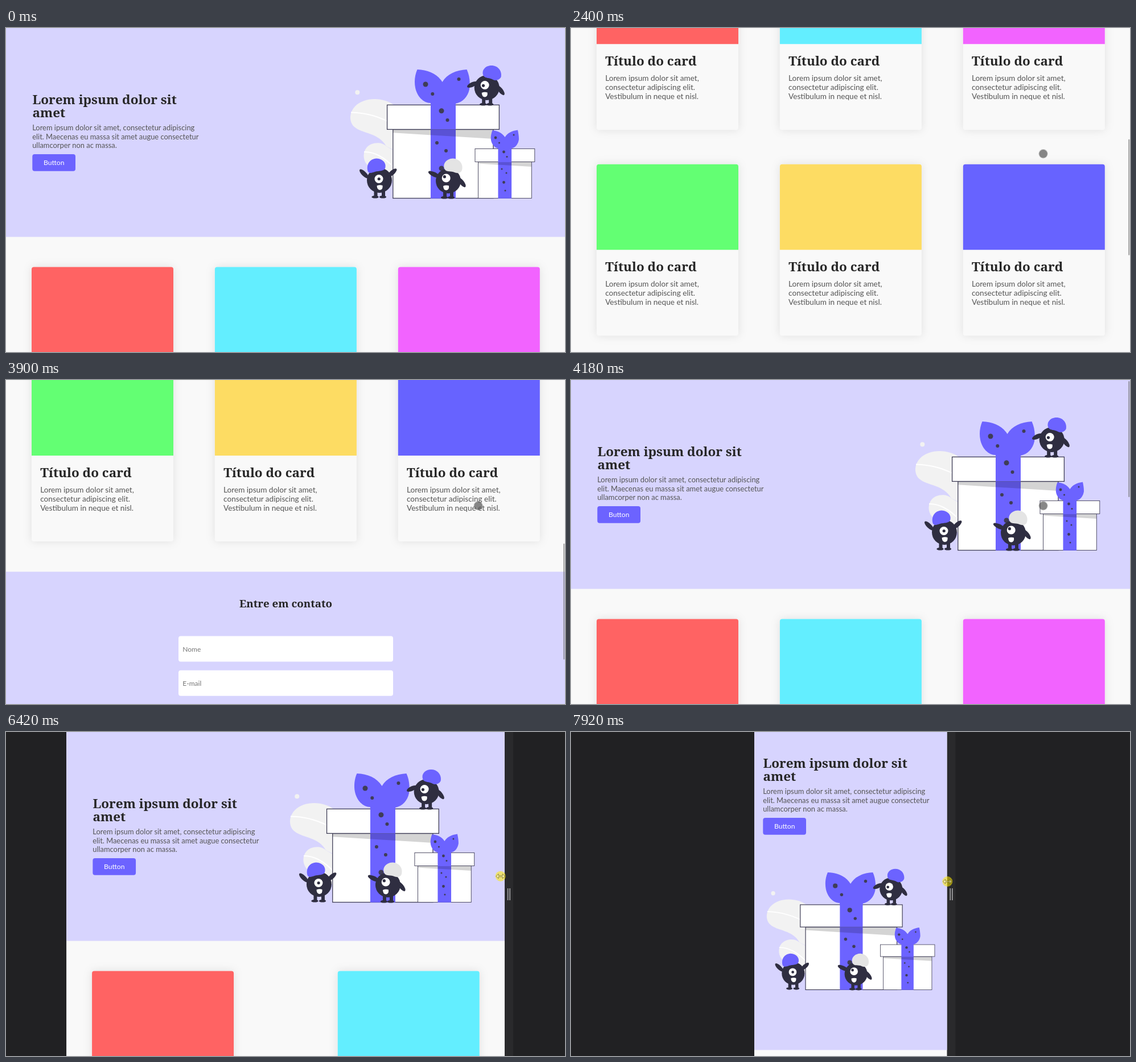
An HTML page for the animation above (7.99 s loop, 982 px wide and 570 px high).

```html
<!DOCTYPE html>
<html lang="pt">
<head>
<meta charset="utf-8">
<title>Landing page</title>
<style>
  html, body { margin: 0; width: 100%; height: 100%; overflow: hidden; background: #212123; }
  svg { display: block; }
  text { font-family: Lato, sans-serif; fill: #555; white-space: pre; }
  .h { font: 700 22.5px Merriweather, "Noto Serif", serif; fill: #262626; }
  .lead { font-size: 12.9px; }
  .body { font-size: 13.6px; }
  .field { font-size: 12px; fill: #757575; }
  .btn { font-size: 12.2px; fill: #fff; }
  .send { font: 13.3px Merriweather, "Noto Serif", serif; fill: #fff; }
  .card { filter: drop-shadow(0 0 8px rgba(0, 0, 0, .1)); }
  .line { fill: #fff; stroke: #3f3d56; }
</style>
</head>
<body>
<svg id="stage" width="982" height="570" viewBox="0 0 982 570">
  <rect width="982" height="570" fill="#212123"/>
  <g id="handle">
    <rect width="15" height="570" fill="#2a2a2c"/>
    <path d="M5.7 275v21M9.3 275v21" stroke="#a8a8aa" stroke-width="1.6"/>
  </g>
  <svg id="page" y="0" height="570" overflow="hidden">
    <rect width="982" height="570" fill="#f9f9f9"/>
    <g id="doc">
      <rect id="hero" width="982" fill="#d7d4fe"/>
      <g id="intro"></g>
      <g id="art"></g>
      <g id="cards"></g>
      <g id="contact"></g>
    </g>
    <rect id="bar" x="979" width="2.4" height="204" rx="1" fill="#777" fill-opacity=".6"/>
  </svg>
  <g id="dot">
    <circle r="8.2" fill="#555" fill-opacity=".25"/>
    <circle r="7.2" fill="#505050" fill-opacity=".58"/>
  </g>
  <g id="grab">
    <circle r="9" fill="#ffeb00" fill-opacity=".55"/>
    <path d="M-8 0l4.5-4v3h7v-3l4.5 4l-4.5 4v-3h-7v3z" fill="#fff" fill-opacity=".35"
      stroke="#6a601c" stroke-width=".8" stroke-opacity=".85"/>
  </g>
</svg>
<script>
const $ = id => document.getElementById(id);
const VIOLET = '#6c63ff', INK = '#2f2e41';

// ---- markup helpers ----
const text = (cls, x, y, s, extra = '') => `<text class="${cls}" x="${x}" y="${y}" ${extra}>${s}</text>`;
const rect = (x, y, w, h, fill, extra = '') =>
  `<rect x="${x}" y="${y}" width="${w}" height="${h}" fill="${fill}" ${extra}/>`;
const box = (x, y, w, h, sw) =>
  `<rect class="line" x="${x}" y="${y}" width="${w}" height="${h}" stroke-width="${sw}"/>`;
const path = (d, fill, extra = '') => `<path d="${d}" fill="${fill}" ${extra}/>`;
const ball = (x, y, r, fill) => `<circle cx="${x}" cy="${y}" r="${r}" fill="${fill}"/>`;
const oval = (x, y, rx, ry, turn = 0) =>
  `<ellipse rx="${rx}" ry="${ry}" fill="${INK}" transform="translate(${x} ${y}) rotate(${turn})"/>`;
const spots = (r, ...pts) => pts.map(([x, y]) => ball(x, y, r, '#3f3d56')).join('');

// Arms are [x, y, length, angle]; everything is relative to the body centre.
function monster(x, y, { eye, pupil, mouth, arms, feet, hat, color }) {
  const arm = ([ax, ay, len, turn]) => oval(ax, ay, len, 4, turn);
  const leg = fx => rect(fx - 3, 15, 6, 14, INK) + oval(fx - 1, 29.2, 6, 2.4);
  const [mx, my] = mouth;
  return `<g transform="translate(${x} ${y})">` +
    feet.map(leg).join('') + ball(0, 0, 22, INK) + arms.map(arm).join('') +
    ball(...eye, 7.5, '#fff') + ball(...pupil, 2.6, INK) +
    path(`M${mx - 5} ${my - 3}q5-2 10-.5q1 7.5-4.5 8q-5 0-5.5-7.5z`, '#fff') +
    path(hat, color) + '</g>';
}

// ---- content ----
$('intro').innerHTML =
  text('h', 46.5, 134, 'Lorem ipsum dolor sit') + text('h', 46.5, 156.5, 'amet') +
  ['Lorem ipsum dolor sit amet, consectetur adipiscing',
   'elit. Maecenas eu massa sit amet augue consectetur',
   'ullamcorper non ac massa.'].map((s, i) => text('lead', 46.2, 180 + i * 15.6, s)).join('') +
  rect(46.3, 222, 75.7, 29.7, VIOLET, 'rx="4"') +
  text('btn', 84.2, 241.3, 'Button', 'text-anchor="middle"');

$('art').innerHTML =
  // plant
  ball(617.3, 113.3, 4, '#f2f2f2') +
  path('M682 136C665 122 630 120 613 138C602 150 603 166 612 174C625 186 655 184 668 208L682 215z', '#f2f2f2') +
  path('M682 216L668 208C660 200 642 200 633 211C626 220 627 235 637 243C650 252 670 262 682 270z', '#f2f2f2') +
  path('M606 148.5C635 149 658 157 682 170M629 218C645 217 665 227 682 246', 'none', 'stroke="#fff" stroke-width="2"') +
  // large gift
  box(679.8, 178.5, 176.2, 121, 1.3) + box(669.6, 135.4, 196.8, 43, 1.3) +
  rect(746, 130, 44, 169.8, VIOLET) +
  path('M766.5 95C757 80 742 74 722.5 73C718 83 717 95 719 105C722 120 733 132 746 132V137H790V133' +
    'C803 130 811 121 814 108C816 95 814 83 809.5 73C790 74 775 81 766.5 95z', VIOLET) +
  path('M680 179H856V195L680 184.3z', '#000', 'fill-opacity=".17"') +
  path('M746 178.5h44', 'none', 'stroke="#3f3d56" stroke-width=".8" stroke-opacity=".6"') +
  spots(4.5, [737, 99], [765, 145.8], [765, 247]) +
  spots(3, [749.3, 116], [795.5, 90], [775.5, 162], [757, 202], [773, 216]) +
  // small gift
  box(829.5, 235.5, 93.8, 64, .9) + box(824, 212.4, 104.8, 23, .9) +
  rect(864.5, 205, 23.6, 94.8, VIOLET) +
  path('M876.5 192C871 184 864 181 854.5 180C851 189 850.5 198 855 205C858 209 861 211 864.5 212H888' +
    'C896 210 900 203 901 196C901 190 900 184 899 179.5C888 181 881 185 876.5 192z', VIOLET) +
  path('M830 236H923V244L830 238.6z', '#000', 'fill-opacity=".17"') +
  spots(2.4, [860, 193], [874.5, 218], [874.5, 271.5]) +
  spots(1.5, [866.5, 202], [892, 188], [880, 226.5], [871, 248], [879, 255], [877, 286]) +
  monster(656, 268, {
    eye: [-1, -2.5], pupil: [-.8, -2.5], mouth: [.5, 12.5], feet: [-6.5, 7],
    arms: [[-27, -11.5, 10.5, 45], [22.5, -13.5, 10, -42]], color: VIOLET,
    hat: 'M-20-15C-24-26-18-38-5-38.5C6-38 13-30 10-21C8-16-1-17-8-15C-13-13-18-12-20-15z'
  }) +
  monster(777, 269, {
    eye: [-3.8, -5], pupil: [-6.6, -7.3], mouth: [-4, 12], feet: [-6, 6],
    arms: [[-25, -11.5, 11, 25], [23.5, 2.5, 10.5, 52]], color: '#e4e4e4',
    hat: 'M-6-20C-11-29-4-39 8-39.5C20-39 27-29 24-19C22-13 15-13 11-15C6-18-3-15-6-20z'
  }) +
  monster(844.7, 105, {
    eye: [-3.5, -4.5], pupil: [-6.2, -3.7], mouth: [-4, 12], feet: [-5.5, 6.5],
    arms: [[-25.5, -5.5, 10, -25], [24, 4.5, 10.5, 52]], color: VIOLET,
    hat: 'M-6-21C-10-30-3-39 8-39C20-39 27-29 25-19C22-13 15-12 11-14C5-18-3-16-6-21z'
  });

const COLORS = ['#ff6363', '#63eeff', '#f263ff', '#63ff73', '#fddc63', '#6763ff'];
$('cards').innerHTML = COLORS.map(c => '<g>' +
  rect(0, 0, 249, 301.5, '#f9f9f9', 'rx="4" class="card"') +
  path('M0 150.5V4a4 4 0 0 1 4-4H245a4 4 0 0 1 4 4V150.5z', c) +
  text('h', 15.3, 188.5, 'Título do card') +
  ['Lorem ipsum dolor sit amet,', 'consectetur adipiscing elit.', 'Vestibulum in neque et nisl.']
    .map((s, i) => text('body', 15.2, 215 + i * 16.35, s)).join('') + '</g>').join('');
const cards = [...$('cards').children];

const FIELDS = ['Nome', 'E-mail', 'Telefone', 'Mensagem...'];
$('contact').innerHTML = rect(0, 0, 982, 436, '#d7d4fe') +
  text('h', 491.5, 62.5, 'Entre em contato', 'text-anchor="middle" style="font-size:18.7px"') +
  FIELDS.map((s, i) => rect(303, 113.2 + i * 60.3, 377, 45, '#fff', 'rx="4"') +
    text('field', 310.3, (i < 3 ? 140.4 : 132.2) + i * 60.3, s)).join('') +
  path('M676.5 338l2-2M678.2 338.2l.6-.6', 'none', 'stroke="#555" stroke-width=".9"') +
  rect(303, 354.2, 377, 45.4, VIOLET, 'rx="4"') +
  text('send', 491.3, 381.2, 'Enviar mensagem', 'text-anchor="middle"');

// ---- timeline ----
const LOOP = 7990;
const run = (a, b, n) => Array.from({ length: n }, (_, i) => Math.round((a + (b - a) * i / (n - 1)) / 10) * 10);
// The picture only refreshes at these moments.
const TICKS = [0, ...run(640, 790, 3), ...run(1120, 1320, 4), 1450, 1580, 1720, 2050, 2190,
  ...run(2330, 2880, 8), 3230, 3280, 3430, ...run(3830, 4180, 6), 4580, ...run(4720, 4860, 3),
  ...run(5000, 5270, 5), 5890, 5950, ...run(6020, 6630, 10), ...run(6700, 7450, 12), ...run(7510, 7920, 7)];

const SCROLL = [[1090, 0], [1190, 60], [1450, 301.5], [1580, 440], [1720, 526],
  [2310, 526], [2410, 610], [2700, 930], [2880, 1002.5],
  [3800, 1002.5], [3900, 800], [4080, 130], [4180, 0]];
const EDGES = [[5890, 0, 982], [6630, 167, 815], [6900, 211.5, 772.5], [7450, 293, 690], [7920, 322, 660.5]];
const DOT = [[640, 866, 221.5], [790, 829.6, 221.3], [4860, 829.6, 221.3], [5000, 956, 234], [5200, 972, 235.5]];
const GRAB = [[5270, 988.3, 239.3], [5890, 988.3, 239.3], [6630, 800, 262], [6900, 758.8, 266.7],
  [7450, 685, 265], [7920, 661.3, 263]];
const BAR = [[0, 0], [1120, 1], [2050, .9], [2190, 0], [2330, 1], [3230, .6], [3280, .3], [3430, 0],
  [3830, 1], [4580, .7], [4720, .4], [4790, .15], [4860, 0]];

function at(track, t) {
  const i = track.findIndex(k => k[0] > t);
  if (i === 0) return track[0].slice(1);
  if (i < 0) return track[track.length - 1].slice(1);
  const a = track[i - 1], b = track[i], u = (t - a[0]) / (b[0] - a[0]);
  return a.slice(1).map((v, j) => v + (b[j + 1] - v) * u);
}
const last = (list, ok) => list.filter(ok).pop();
const move = (el, x, y, more = '') => el.setAttribute('transform', `translate(${x} ${y}) ${more}`);
const show = (el, on) => el.setAttribute('opacity', +on);

function layout(w) {
  const wide = w > 722;
  const artW = wide ? 338 : Math.min(338, w - 30.5);
  const heroH = wide ? 367.5 : 338 + artW * .719;
  $('hero').setAttribute('height', heroH);
  move($('intro'), wide ? 0 : -31, wide ? 0 : -71);
  move($('art'), wide ? w - 384 : 15.5, wide ? 62 : 237, `scale(${artW / 338}) translate(-598 -62)`);
  const cols = w > 838 ? 3 : 2, step = (w - 338.2) / (cols - 1);
  cards.forEach((c, i) => move(c, 45 + i % cols * step, heroH + 53 + Math.floor(i / cols) * 362));
  move($('contact'), 0, 1137.3);
  show($('contact'), cols === 3);
}

function render(now) {
  const t = last(TICKS, k => k <= now);
  const [scroll] = at(SCROLL, t), [left, right] = at(EDGES, t);
  $('page').setAttribute('x', left);
  $('page').setAttribute('width', right - left);
  layout(right - left);
  move($('handle'), right, 0);
  move($('doc'), 0, -scroll);
  $('bar').setAttribute('y', 2 + 358 * scroll / 1002.5);
  show($('bar'), last(BAR, k => k[0] <= t)[1]);
  move($('dot'), ...at(DOT, t));
  show($('dot'), t >= 640 && t < 4860 || t >= 5000 && t < 5270);
  move($('grab'), ...at(GRAB, t));
  show($('grab'), t >= 5270);
}

const start = performance.now();
function frame() {
  render((performance.now() - start) % LOOP);
  requestAnimationFrame(frame);
}
frame();
</script>
</body>
</html>
```
